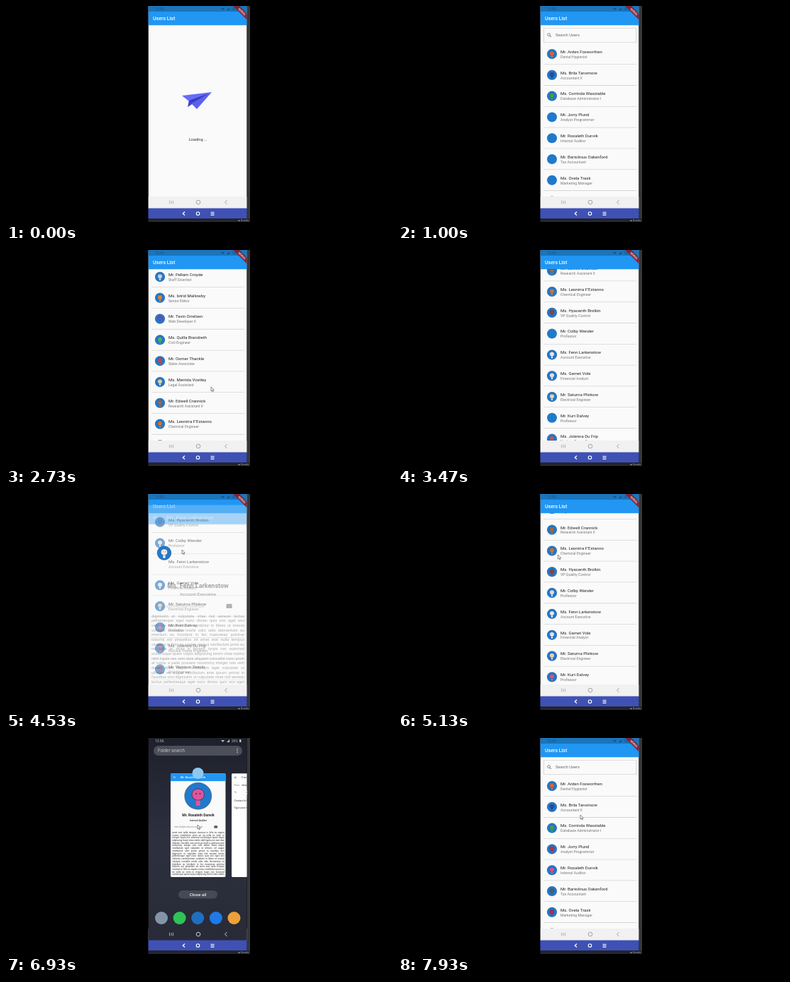
Write an HTML page with a canvas that moves like this. It is 544x306 px and loops after 8 s.

```html
<!DOCTYPE html>
<html lang="en">
<head>
<meta charset="utf-8">
<title>Users List</title>
<style>
html, body { margin: 0; width: 100%; height: 100%; overflow: hidden; background: #000; }
canvas { display: block; width: 544px; height: 306px; }
</style>
</head>
<body>
<canvas id="stage"></canvas>
<script>
const LOOP = 8000, L = 200.5, W = 139, R = L + W, ROW = 29.8;
const canvas = document.getElementById('stage');
const ctx = canvas.getContext('2d');
const dpr = window.devicePixelRatio || 1;
canvas.width = 544 * dpr;
canvas.height = 306 * dpr;

const BLUE = '#2196f3', INDIGO = '#3f51b5', PAPER = '#fafafa';
const users = `Arden Foxworthen|Dental Hygienist|#e8643c
Brila Tansmore|Accountant II|#2b4f96
Corrinda Waxstable|Database Administrator I|#43a552
Jorry Plund|Analyst Programmer|#c8323c
Rosaleth Dunvik|Internal Auditor|#e0559a
Bartolinus Oakenford|Tax Accountant|#4a6670
Ovela Trask|Marketing Manager|#a8305c
Pellam Croyde|Staff Scientist|#d8d8e0
Istrid Mallowby|Senior Editor|#e08a3c
Tavin Orrelsen|Web Developer II|#7a4fb0
Quilla Brandreth|Civil Engineer|#58b070
Osmer Thackle|Sales Associate|#d04848
Merrida Vostley|Legal Assistant|#e8d8b0
Edwell Crannick|Research Assistant II|#b06a3c
Leonirra F'Estanno|Chemical Engineer|#d07a3c
Hyacenth Brolkin|VP Quality Control|#8c4640
Colby Wender|Professor|#e4e4ea
Fenn Larkenstow|Account Executive|#f0f0f2
Garnet Vole|Financial Analyst|#ececf0
Saturna Plinkow|Electrical Engineer|#ecdcc0
Kurt Dalvey|Professor|#d0608a
Jolenna Du Frip|Nuclear Power Engineer|#c05a70
Wynmar Tesolo|Civil Engineer|#b04858
Addis Quern|Paralegal|#60a0b0`.split('\n').map((line, i) => {
  const [name, job, ink] = line.split('|');
  const title = [1, 2, 6, 8, 10, 12, 14, 15, 17, 18, 21].includes(i) ? 'Ms. ' : 'Mr. ';
  return { name: title + name, job, ink };
});
const FENN = 17, ROSA = 4;

const lorem = ('dignissim ut vulputate vitae nisl aenean lectus pellentesque eget nunc donec quis orci ' +
  'eget orci vehicula condimentum curabitur in libero ut massa volutpat convallis morbi odio odio ' +
  'elementum eu interdum eu tincidunt in leo maecenas pulvinar lobortis est phasellus sit amet erat ' +
  'nulla tempus vivamus in felis eu sapien cursus vestibulum proin eu mi nulla ac enim in tempor ' +
  'turpis nec euismod scelerisque quam turpis adipiscing lorem vitae mattis nibh ligula nec sem duis ' +
  'aliquam convallis nunc proin at turpis a pede posuere nonummy integer non velit donec diam neque ' +
  'vestibulum eget vulputate ut ultrices vel augue vestibulum ante ipsum primis in faucibus orci').split(' ');

const clamp = v => Math.min(1, Math.max(0, v));
const seg = (t, a, b) => clamp((t - a) / (b - a));
const mix = (a, b, k) => a + (b - a) * k;
const smooth = k => k * k * (3 - 2 * k);
const out = k => 1 - (1 - k) * (1 - k);

// Eased value along [time, value] points
function track(t, pts) {
  let v = pts[0][1];
  for (let i = 1; i < pts.length; i++)
    v = mix(v, pts[i][1], smooth(seg(t, pts[i - 1][0], pts[i][0])));
  return v;
}

function rect(x, y, w, h, fill, r = 0) {
  ctx.beginPath();
  ctx.roundRect(x, y, w, h, r);
  ctx.fillStyle = fill;
  ctx.fill();
}
function disc(x, y, r, fill) {
  ctx.beginPath();
  ctx.arc(x, y, r, 0, 7);
  ctx.fillStyle = fill;
  ctx.fill();
}
function ring(x, y, r, color, w = 0.9) {
  ctx.beginPath();
  ctx.arc(x, y, r, 0, 7);
  ctx.strokeStyle = color;
  ctx.lineWidth = w;
  ctx.stroke();
}
function path(pts, fill, stroke, w = 0.9) {
  ctx.beginPath();
  for (let i = 0; i < pts.length; i += 2) ctx.lineTo(pts[i], pts[i + 1]);
  if (fill) { ctx.closePath(); ctx.fillStyle = fill; ctx.fill(); }
  if (stroke) { ctx.strokeStyle = stroke; ctx.lineWidth = w; ctx.stroke(); }
}
function text(s, x, y, size, color, weight = 400, align = 'left') {
  ctx.font = `${weight} ${size}px Roboto, sans-serif`;
  ctx.textAlign = align;
  ctx.textBaseline = 'middle';
  ctx.fillStyle = color;
  ctx.fillText(s, x, y + 0.3);
}
function layer(fn, alpha = 1, dx = 0, dy = 0) {
  ctx.save();
  ctx.globalAlpha *= alpha;
  ctx.translate(dx, dy);
  fn();
  ctx.restore();
}
function clip(x, y, w, h, fn) {
  ctx.save();
  ctx.beginPath();
  ctx.rect(x, y, w, h);
  ctx.clip();
  fn();
  ctx.restore();
}

function status(time, color) {
  text(time, 210, 4, 5, color);
  path([303, 3, 308, 3, 305.5, 6], color);
  path([311, 6, 315, 6, 315, 2], color);
  text('26%', 318, 4, 5, color);
  rect(329, 2, 2.4, 4, color);
}
function blueStatus() {
  rect(L, 0, W, 8, '#1b75bb');
  status('12:55', '#185286');
}
function backArrow(x, y, color) {
  path([x + 3, y, x - 3, y], 0, color);
  path([x, y - 3, x - 3, y, x, y + 3], 0, color);
}
function chevron(x, y, color) {
  path([x - 2, y - 1, x, y + 1, x + 2, y - 1], 0, color, 0.8);
}
function appBar(title, x) {
  rect(L, 0, W, 27, BLUE);
  rect(L, 27, W, 1, 'rgba(0,0,0,.12)');
  text(title, x, 17.5, 7, '#fff', 500);
}
function avatar(x, y, r, ink) {
  disc(x, y, r, '#2179cb');
  if (!ink) return;
  layer(() => {
    ctx.scale(r / 7, r / 7);
    rect(-1.1, 1.5, 2.2, 3.6, ink, 0.8);
    ctx.beginPath();
    ctx.ellipse(0, -0.8, 3.2, 3, 0, 0, 7);
    ctx.fillStyle = ink;
    ctx.fill();
    ctx.strokeStyle = 'rgba(50,20,50,.6)';
    ctx.lineWidth = 0.35;
    ctx.stroke();
    disc(-1, -1.2, 0.4, 'rgba(40,30,60,.7)');
    disc(1, -1.2, 0.4, 'rgba(40,30,60,.7)');
  }, 1, x, y);
  ring(x, y, r - 0.3, 'rgba(70,90,120,.5)', r / 14);
}

function loading(t) {
  rect(L, 0, W, 270, PAPER);
  layer(() => {
    path([290, 122, 248, 127, 258, 135], '#656cf7');
    path([290, 122, 258, 134, 256, 143, 263, 138], '#3a3cba');
    path([290, 122, 261, 138, 269, 146], '#5a61f2');
    path([263, 138.5, 256, 143, 260, 136], '#4548cf');
  }, 1, 2 * Math.sin(t / 140), -3 * Math.sin(t / 110));
  text('Loading ...', 270.5, 189, 5.6, '#333', 400, 'center');
  appBar('Users List', 207);
}

function list(t, scroll, hidden = -1) {
  rect(L, 0, W, 270, PAPER);
  clip(L, 27, W, 243, () => {
    ctx.translate(0, -scroll);
    rect(205, 31, 131, 21, '#c4c4c4', 1.5);
    rect(205.6, 31.6, 129.8, 19.8, PAPER, 1);
    ring(212.6, 40.6, 1.9, '#666', 0.8);
    path([214, 42, 216, 44], 0, '#666');
    text('Search Users', 222, 41, 5.8, '#666');
    users.forEach((u, i) => {
      const y = i * ROW;
      const ready = t > (i < 8 ? 930 + i * 28 : i === 16 || i === 20 ? 3700 : 0);
      if (i !== hidden) avatar(217, 68 + y, 7, ready && u.ink);
      text(u.name, 229, 64.8 + y, 6, '#222');
      text(u.job, 229, 72 + y, 5.2, '#777');
      rect(205, 82.3 + y, 131, 0.8, '#d6d6d6');
    });
  });
  const glow = seg(t, 1840, 1920) * (1 - seg(t, 1990, 2080));
  if (glow) clip(L, 27, W, 40, () => {
    ctx.beginPath();
    ctx.ellipse(290, 27, 125, 21 * glow, 0, 0, 7);
    ctx.fillStyle = 'rgba(33,150,243,.24)';
    ctx.fill();
  });
  appBar('Users List', 207);
}

function bio(shift) {
  const width = 131, words = lorem.slice(shift).concat(lorem, lorem);
  ctx.font = '400 5.5px Roboto, sans-serif';
  const space = ctx.measureText(' ').width;
  for (let y = 157; y < 270; y += 6.65) {
    const line = [];
    let used = 0;
    while (true) {
      const w = ctx.measureText(words[0]).width;
      if (used + w + line.length * space > width) break;
      line.push([words.shift(), w]);
      used += w;
    }
    const gap = (width - used) / (line.length - 1);
    let x = 205;
    for (const [word, w] of line) {
      text(word, x, y, 5.5, '#333');
      x += w + gap;
    }
  }
}

function detail(id, showFace = true) {
  const u = users[id];
  rect(L, 0, W, 270, PAPER);
  appBar(u.name, 226);
  backArrow(211, 17.5, '#fff');
  if (showFace) avatar(270, 65, 34, u.ink);
  text(u.name, 270.5, 114, 9, '#222', 700, 'center');
  text(u.job, 270.5, 126, 6.2, '#333', 500, 'center');
  text(id === ROSA ? 'rdunvik4@mailroom.example' : 'flarkenstow9@post.example', 210, 143, 5.5, '#888');
  rect(310.5, 140, 8, 6, '#333', 0.8);
  path([311, 141, 314.5, 143.5, 318, 141], 0, PAPER, 0.8);
  clip(L, 150, W, 120, () => bio(id === ROSA ? 40 : 0));
}

// Page fades in while rising; the avatar flies from its row along an arc
function push(t, scroll, id, k) {
  if (k >= 1) return detail(id);
  list(t, scroll, k > 0 ? id : -1);
  if (k <= 0) return;
  layer(() => detail(id, false), Math.pow(k, 1.4), 0, 65 * (1 - out(k)));
  const y = 68 + id * ROW - scroll, a = Math.pow(k, 1.75) * Math.PI / 2;
  avatar(mix(217, 270, 1 - Math.cos(a)), mix(y, 65, Math.sin(a)), mix(7, 34, Math.pow(k, 3.2)), users[id].ink);
}

function key(s, x, y, w = 11.6, h = 14.5, fill = '#fff') {
  rect(x - w / 2, y - h / 2, w, h, fill, 1.6);
  text(s, x, y, 7, '#222', 400, 'center');
}
function keyboard() {
  const dark = '#d2d4d8', ink = '#444';
  rect(L, 157, W, 130, '#dcdee1');
  disc(214, 167, 3, '#666');
  rect(235.5, 164, 5.5, 5.5, '#666', 1);
  rect(260, 164, 6.5, 5.5, '#666', 1);
  rect(286.8, 163.5, 2.6, 5, '#666', 1.3);
  path([288, 168, 288, 171], 0, '#666');
  ring(312.5, 167, 2.2, '#666', 1.6);
  text('···', 330, 167, 7, '#666', 700, 'center');
  [['1234567890', 210.5, 183, 13], ['qwertyuiop', 210.5, 200], ['asdfghjkl', 217, 219], ['zxcvbnm', 230.3, 238]]
    .forEach(([row, x, y, h]) => [...row].forEach((c, i) => key(c, x + i * 13.4, y, 11.6, h)));
  key('', 212.5, 238, 15, 14.5, dark);
  path([212.5, 234, 216, 238, 214, 238, 214, 241.5, 211, 241.5, 211, 238, 209, 238], ink);
  key('', 328.5, 238, 15, 14.5, dark);
  path([324, 238, 326.3, 235.5, 332.5, 235.5, 332.5, 240.5, 326.3, 240.5], ink);
  text('×', 329.5, 238, 5, '#fff', 700, 'center');
  key('', 213, 257, 16, 14.5, dark);
  text('!#1', 213, 257, 6, '#222', 400, 'center');
  key('?', 230.3, 257);
  key('', 270.5, 257, 64.5);
  text('◂  English(UK)  ▸', 270.5, 257, 4.8, '#333', 400, 'center');
  key('.', 310.5, 257);
  key('', 327.5, 257, 17, 14.5, dark);
  path([331, 254, 331, 258, 325, 258], 0, ink);
  path([327, 255.5, 324, 258, 327, 260.5], ink);
}
function compose(t, keys = 0) {
  const ink = '#333', grey = '#777';
  rect(L, 0, W, 270, '#fff');
  status('12:56', '#888');
  backArrow(211, 18, '#444');
  text('Compose', 226, 18, 7.4, ink);
  rect(298.5, 16, 7, 3.6, '#666', 1.8);
  rect(300.5, 17.3, 4, 1, '#fff');
  path([314, 14, 322, 18, 314, 22, 314.8, 18.6, 318, 18, 314.8, 17.4], '#1a73e8');
  [15, 18, 21].forEach(y => disc(332.5, y, 0.9, '#555'));
  text('From', 207, 37, 6, grey);
  text('ideasbox20@example.com', 226, 37, 6.2, ink);
  text('To', 207, 56, 6, grey);
  rect(226, 50.5, 85, 11, '#e3e3e3', 5.5);
  rect(226.5, 51, 84, 10, '#fff', 5);
  text('rdunvik4@mailroom.example', 237, 56, 5.5, ink);
  chevron(330, 37, grey);
  chevron(330, 56, grey);
  [46.5, 66, 85.5].forEach(y => rect(L, y, W, 0.5, '#f2f2f2'));
  text('Contact Information', 207, 76, 6.65, ink);
  text('Type your mail here', 207, 95, 6.65, ink);
  if (keys && t < 6470) rect(265.8, 91, 0.8, 8, '#333');
  if (keys) layer(keyboard, 1, 0, 130 * (1 - keys));
}

// k = 0 fills the phone, k = 1 sits in the overview
function card(fn, x, k) {
  const s = mix(1, 0.56, k);
  ctx.save();
  ctx.translate(mix(L, x, k), mix(8, 50.3, k));
  ctx.scale(s, s);
  ctx.translate(-L, -8);
  ctx.beginPath();
  ctx.roundRect(L, 8, W, 262, 3 * k);
  ctx.clip();
  fn();
  ctx.restore();
}
function switcher(t) {
  const g = ctx.createLinearGradient(0, 0, 0, 287);
  g.addColorStop(0, '#1e212c');
  g.addColorStop(0.5, '#2c303d');
  g.addColorStop(1, '#282b37');
  rect(L, 0, W, 287, g);
  const open = out(seg(t, 7160, 7290)), shrink = out(seg(t, 6640, 6770));
  const slide = 86 * (1 - smooth(seg(t, 6770, 6900)));
  status('12:56', '#bbb');
  layer(() => {
    rect(208, 11, 125, 14, '#4c4f58', 7);
    text('Folder search', 214, 18, 6.3, '#c0c2c6');
    [15.5, 18, 20.5].forEach(y => disc(326, y, 0.7, '#ddd'));
    rect(243, 216, 55, 11.5, '#474a55', 5.7);
    text('Close all', 270.5, 221.7, 6.2, '#eee', 500, 'center');
    ['#8494a8', '#2fc455', '#1f6fc0', '#1f7ae8', '#eda13a'].forEach((c, i) => disc(219 + i * 25.6, 255, 9, c));
  }, shrink * (1 - open));
  card(() => compose(t), 317.8 - slide, shrink);
  card(() => detail(ROSA), 231.8 - slide, 1 - open);
  if (!open) disc(270.5 - slide, 50, 8, '#8cc8f2');
}

function nav(color, down) {
  [230.5, 233, 235.5].forEach(x => rect(x - 0.3, 275.7, 0.7, 4.6, color));
  ring(271, 278, 2.8, color);
  if (down) path([307, 276.8, 310, 279.8, 313, 276.8], 0, color);
  else path([311.5, 275, 308.5, 278, 311.5, 281], 0, color);
}
function banner() {
  clip(L, 0, W, 60, () => {
    ctx.translate(332.5, 8);
    ctx.rotate(Math.PI / 4);
    rect(-24, -3.2, 48, 6.4, 'rgba(135,28,40,.88)');
    text('DEBUG', 0, 0, 4, '#f0dde0', 700, 'center');
  });
}
function windowBar() {
  rect(L, 0, W, 11.5, INDIGO);
  text('Phone', 213, 6, 5, '#fff', 500);
  disc(242, 6, 1.9, '#dfe3f5');
  rect(246.5, 4.3, 4.4, 3.4, '#dfe3f5');
  ring(255.5, 6, 1.7, '#dfe3f5');
  rect(260, 4, 3.2, 4, '#dfe3f5');
  ring(270, 6, 1.5, '#dfe3f5');
  rect(318, 7.5, 4, 0.9, '#fff');
  ctx.strokeStyle = '#fff';
  ctx.lineWidth = 0.7;
  ctx.strokeRect(325.5, 4.5, 3.5, 3.5);
  path([333.5, 4.5, 337, 8], 0, '#fff', 0.8);
  path([337, 4.5, 333.5, 8], 0, '#fff', 0.8);
}
function cursor(t) {
  if (t < 1200 || (t > 3300 && t < 3800)) return;
  const x = track(t, [[1200, 300], [1850, 314], [2000, 314], [2300, 300], [3800, 245], [4400, 248], [4650, 248],
    [5000, 212], [5300, 245], [5550, 314], [5850, 226], [6420, 226], [6620, 233], [6850, 270], [7250, 270],
    [7500, 212], [7850, 257]]);
  const y = track(t, [[1200, 200], [1850, 250], [2000, 250], [2300, 210], [3800, 130], [4400, 79], [4650, 79],
    [5000, 18], [5300, 186], [5550, 143], [5850, 23], [6400, 23], [6620, 278], [6850, 123], [7250, 123],
    [7500, 18], [7850, 109]]);
  layer(() => path([0, 0, 0, 6, 1.5, 4.8, 2.5, 7, 3.4, 6.5, 2.4, 4.5, 4.2, 4.3, 0, 0], '#fff', '#444', 0.6), 1, x, y);
}

function scene(t) {
  const scroll = track(t, [[1230, 0], [1480, 260], [1600, 260], [1850, 0], [2130, 0], [2420, 130], [2560, 150],
    [2850, 290], [3000, 300], [3400, 426.2], [3600, 426.2], [3950, 475.2], [5080, 475.2], [5290, 0]]);
  if (t < 840) loading(t);
  else if (t < 4960) push(t, scroll, FENN, seg(t, 4460, 4600));
  else if (t < 5320) push(t, scroll, FENN, 1 - seg(t, 4960, 5080));
  else if (t < 5760) push(t, 0, ROSA, seg(t, 5340, 5470));
  else if (t >= 7290) push(t, 0, ROSA, 1 - seg(t, 7520, 7650));
  else if (t >= 6640) switcher(t);
  if (t < 5640 || t >= 7290) blueStatus();
  if (t >= 5640 && t < 6640) {
    const k = out(seg(t, 5640, 5760));
    layer(() => compose(t, out(seg(t, 5720, 5870))), k, 0, 30 * (1 - k));
  }
}

function draw(t) {
  ctx.setTransform(dpr, 0, 0, dpr, 0, 0);
  rect(0, 0, 544, 306, '#000');
  rect(R, 0, 344 - R, 306, '#36373a');
  const mail = t >= 5700 && t < 6640, over = t >= 6640 && t < 7230;
  clip(L, 0, W, 287, () => {
    rect(L, 270, W, 17, '#f1f1f1');
    scene(t);
    if (!mail && !over) rect(L, 270, W, 17, '#f1f1f1');
    nav(over ? '#ddd' : '#999', mail);
  });
  if (t < 5640 || t >= 7290) banner();
  if (t > 1700 && t < 2100) windowBar();
  rect(L, 286.6, W, 14.6, INDIGO);
  path([252, 291.5, 249.3, 294, 252, 296.5], 0, '#fff', 1.2);
  ring(270.5, 294, 2.3, '#fff', 1.1);
  [291.8, 293.8, 295.8].forEach(y => rect(288.5, y, 5, 1, '#fff'));
  rect(L, 301.2, 344 - L, 4.8, '#25272b');
  disc(328.5, 304, 1, '#7fb58a');
  text('Events', 331, 304, 3.8, '#aaa');
  cursor(t);
}

function tick() {
  draw(performance.now() % LOOP);
  requestAnimationFrame(tick);
}
tick();
</script>
</body>
</html>
```
